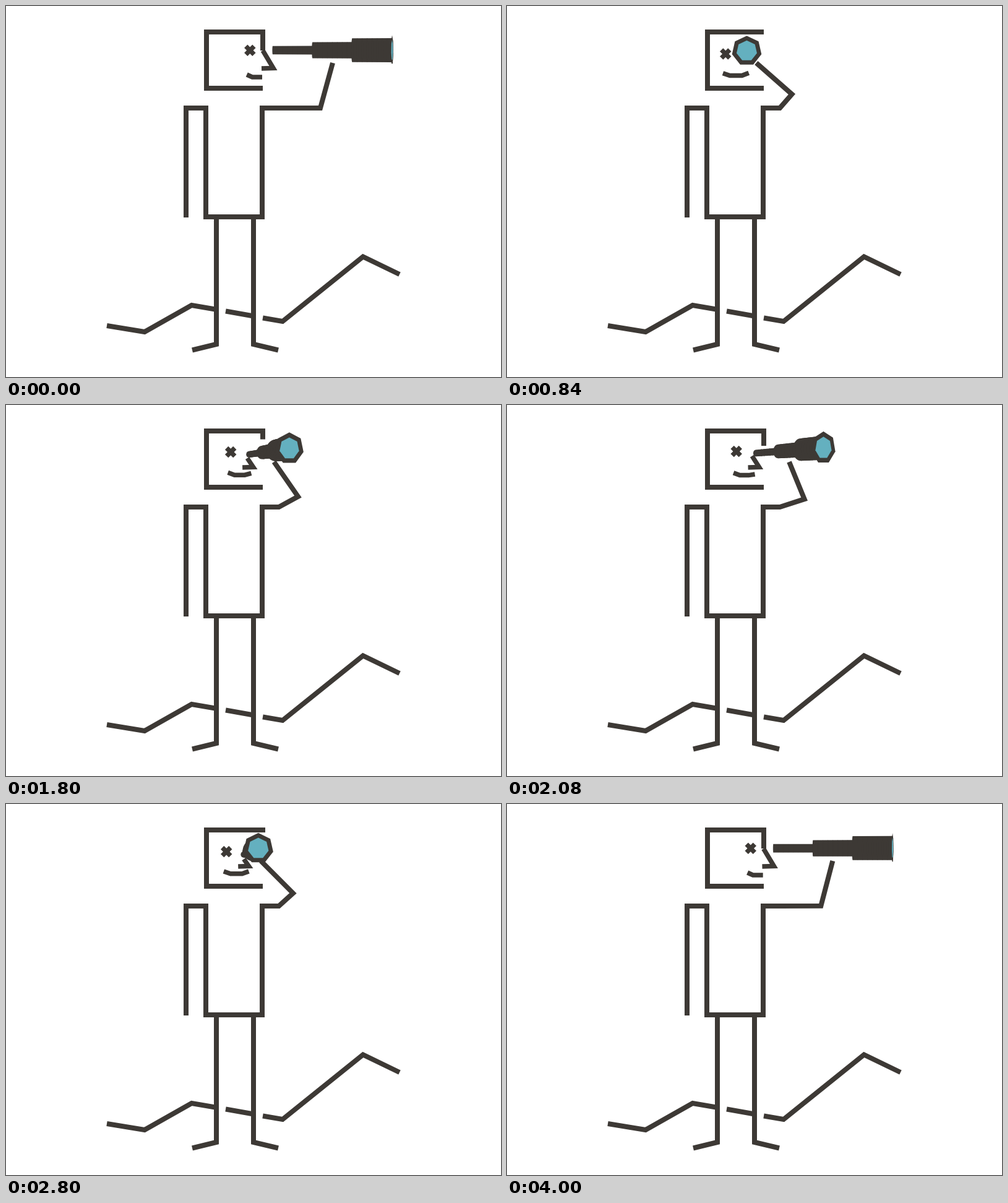
An HTML page with a canvas that plays this animation: 800 by 600 pixels, repeating every 4.04 s.

```html
<!DOCTYPE html>
<html lang="en">
<head>
<meta charset="utf-8">
<title>Lookout</title>
<style>
html, body { margin: 0; width: 100%; height: 100%; overflow: hidden; background: #fff; }
canvas { display: block; width: 800px; height: 600px; }
</style>
</head>
<body>
<canvas id="stage" width="800" height="600"></canvas>
<script>
const ctx = document.getElementById('stage').getContext('2d');
const INK = '#3d3935', GLASS = '#64b0bf';
const LOOP = 4040, STEP = 40;

// Turn of the head over time: 0 faces the viewer, 1 is full profile.
const turns = [
  [0, 480, 1, 0.03],
  [1540, 2020, 0.03, 0.445],
  [2060, 2440, 0.445, 0.03],
  [2640, 3560, 0.03, 0.987]
];

function turnAt(t) {
  let v = 1;
  for (const [start, end, from, to] of turns) {
    if (t < start) break;
    const x = Math.min(1, (t - start) / (end - start));
    v = from + (to - from) * (1 - Math.cos(Math.PI * x)) / 2;
  }
  return v;
}

function line(points, width = 8) {
  ctx.beginPath();
  points.forEach(([x, y]) => ctx.lineTo(x, y));
  ctx.lineWidth = width;
  ctx.stroke();
}

function drawHills() {
  line([[163, 517], [224, 527], [300, 484], [341, 491]]);
  line([[355, 493.5], [400, 501.5]]);
  line([[415, 504.5], [447, 510], [577, 405.5], [636, 434]]);
}

function drawBody(v) {
  line([[340, 343], [340, 547], [301, 556.5]]);
  line([[400, 343], [400, 547], [440, 556.5]]);
  line([
    [291, 342], [291, 165], [323, 165], [323, 341], [414, 341], [414, 165], [441, 165],
    [459 + 49 * v, 142 + 23 * v],
    [399 + 129 * v, 92]
  ]);
}

function drawHead(v) {
  const outline = [[415, 133], [324, 133], [324, 42], [415, 42]];
  if (v > 0.07) outline.push([415, Math.min(72, 40 + 59 * v)]);
  line(outline);

  if (v > 0.06) {
    line([[381 + 34 * v, 91 - 19 * v], [388 + 44 * v, 100.5], [371 + 42 * v, 101]], 7.5);
  }

  const ex = 352 + 42.3 * v, ey = 77.7 - 6 * v, r = 6.6;
  line([[ex - r, ey - r], [ex + r, ey + r]], 7.5);
  line([[ex - r, ey + r], [ex + r, ey - r]], 7.5);

  const low = 112.5 + 2.5 * v;
  line([
    [347.7 + 41.5 * v, 108.7 + 2.3 * v],
    [359 + 39 * v, low],
    [379 + 26 * v, low],
    [390 + 24 * v, Math.min(115, 108 + 9 * v)]
  ], 7.5);
}

function heptagon(x, y, r, squash, color) {
  ctx.beginPath();
  for (let i = 0; i < 7; i++) {
    const a = i * 2 * Math.PI / 7;
    ctx.lineTo(x + r * squash * Math.sin(a), y - r * Math.cos(a));
  }
  ctx.fillStyle = color;
  ctx.fill();
}

function drawTelescope(v) {
  const squash = Math.abs(Math.cos(v * 95 * Math.PI / 180));
  const x0 = 379 + 52 * v, y0 = 83 - 11.5 * v;
  const length = 193 * v * (1.18 + 0.56 * v - 0.74 * v * v);
  const lensY = 73 - 14 * v + 12.5 * v * v;
  const section = (s, radius) => ({
    x: x0 + length * s,
    y: y0 + (lensY - y0) * s,
    r: radius * (1 - 0.3 * squash * (1 - s))
  });

  ctx.fillStyle = INK;
  [7, 13.3, 19.5].forEach((radius, i) => {
    const a = section(i / 3, radius), b = section((i + 1) / 3, radius);
    ctx.beginPath();
    ctx.moveTo(a.x, a.y - a.r);
    ctx.lineTo(b.x, b.y - b.r);
    ctx.lineTo(b.x, b.y + b.r);
    ctx.lineTo(a.x, a.y + a.r);
    ctx.fill();
    for (let k = 0; k <= 8; k++) {
      const c = section((i + k / 8) / 3, radius);
      ctx.beginPath();
      ctx.ellipse(c.x, c.y, c.r * squash, c.r, 0, 0, 2 * Math.PI);
      ctx.fill();
    }
  });

  const bulge = v * (1 - v);
  heptagon(x0 + length, lensY, 24.2 + 9 * bulge, squash, INK);
  heptagon(x0 + length, lensY, 16.8 + 5 * bulge, squash, GLASS);
}

function draw(t) {
  const v = turnAt(t);
  ctx.fillStyle = '#fff';
  ctx.fillRect(0, 0, 800, 600);
  ctx.strokeStyle = INK;
  drawHills();
  drawBody(v);
  drawHead(v);
  drawTelescope(v);
}

const began = performance.now();
function tick() {
  const t = (performance.now() - began) % LOOP;
  draw(Math.floor(t / STEP) * STEP);
  requestAnimationFrame(tick);
}
tick();
</script>
</body>
</html>
```
